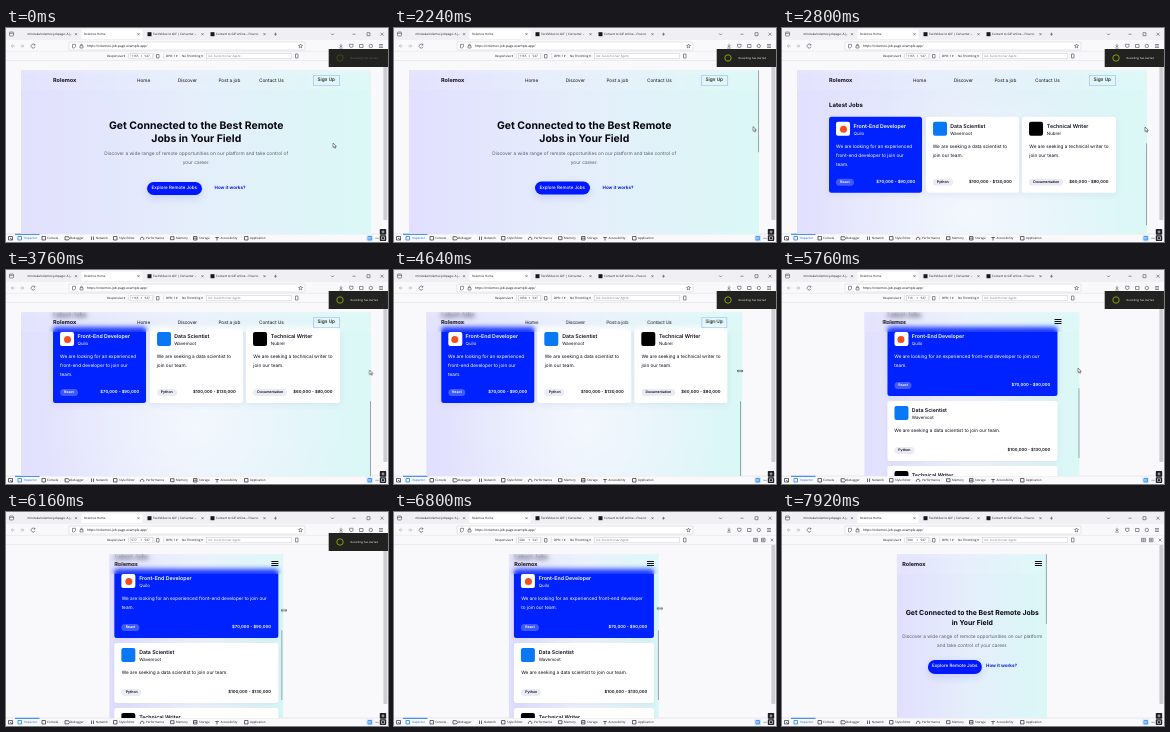
These frames come from a looping animation (382 px wide and 214 px high, 8 s). An HTML page:

```html
<!DOCTYPE html>
<html lang="en">
<head>
<meta charset="utf-8">
<title>Responsive job page</title>
<style>
@property --w { syntax: "<integer>"; inherits: true; initial-value: 1165; }
@property --s { syntax: "<number>"; inherits: true; initial-value: 0; }

* { box-sizing: border-box; margin: 0; padding: 0; }
html, body { width: 100%; height: 100%; overflow: hidden; background: #f9f9fb; }
body { text-rendering: geometricPrecision; }

.stage {
  position: absolute; left: 0; top: 0; width: 382px; height: 214px; overflow: hidden;
  animation: resize 8s linear infinite, scroll 8s linear infinite;
}
.chrome, .over { position: absolute; inset: 0; width: 382px; height: 214px; }
.chrome text, .over text, .dims { font: 3px "Open Sans", "Noto Sans", sans-serif; fill: #15141a; color: #15141a; }
.chrome .soft { fill: #77767f; }
.chrome .tools text { font-weight: 500; }
.icon { fill: none; stroke: #4a4a55; stroke-width: .6; }
.icon.strong { stroke: #2b2a33; stroke-width: .7; }
.icon .faint { stroke: #a5a5ae; }
.field { fill: #fff; stroke: #c9c9d0; stroke-width: .5; }
.dims { position: absolute; left: 125.5px; top: 26px; line-height: 4px; counter-reset: w var(--w); }
.dims::before { content: counter(w); }

/* Simulated device */
.view {
  position: absolute; left: 190.3px; top: 42px; height: 164px;
  width: calc(var(--w) * .3004px); translate: -50% 0; overflow: hidden;
  container-type: inline-size;
  background: linear-gradient(90deg, #e1dffe, #e5eefb 48%, #daf8f6);
  font: 4.7px/9px Inter, "Open Sans", sans-serif; color: #0b0b18;
}
.inner { width: calc(100cqw - 10px); margin: 0 auto; position: relative; }
.page { position: absolute; left: 0; right: 0; top: 0; translate: 0 calc(var(--s) * -1px); }

.head {
  position: absolute; left: 0; right: 0; top: 0; height: 20px;
  background: rgba(255, 255, 255, .1);
  -webkit-backdrop-filter: blur(2.5px); backdrop-filter: blur(2.5px);
}
.head .inner { height: 20px; line-height: 22.4px; white-space: nowrap; }
.logo { font-size: 5.5px; font-weight: 700; }
.links { display: none; position: absolute; left: 35px; top: 0; list-style: none; }
.links li { width: 40.7px; }
.sign { display: none; position: absolute; right: 0; top: 5px; height: 11px; line-height: 11.8px; padding: 0 4.5px; font-weight: 500; border-radius: 1.5px; }
.menu { position: absolute; right: 0; top: 7px; width: 7px; height: 5px; }

.hero { position: relative; height: 164px; text-align: center; }
.hero > * { position: absolute; left: 0; right: 0; margin: 0 auto; }
h1 { top: 53.5px; width: 142px; font-size: 6.9px; line-height: 10px; font-weight: 700; color: #05050c; }
.lead { top: 78.5px; width: 142px; font-size: 4.77px; color: #5b5c6e; }
.acts { top: 106px; display: flex; justify-content: center; gap: 4px; line-height: 13.5px; font-size: 4.5px; }
.acts b { color: #0a1fe8; }
.go { padding: 0 4.5px; border-radius: 7px; background: #0018ff; color: #fff; font-weight: 500; box-shadow: 0 3px 8px rgba(10, 28, 255, .14); }

.jobs { padding-top: 14px; background: radial-gradient(ellipse 45% 60% at 50% 55%, rgba(255, 255, 255, .55), transparent); height: 230px; }
.jobs .inner { max-width: 170px; }
h2 { font-size: 6px; line-height: 8px; font-weight: 700; margin-bottom: 6.5px; }
.cards { display: grid; gap: 4.5px; }
.card { padding: 5.5px 7px 7.5px; border-radius: 2.5px; background: #fff; box-shadow: 0 2px 6px rgba(60, 70, 160, .08); }
.card.hot { background: #0022ff; color: #fff; }
.who { position: relative; height: 14px; padding: 1.8px 0 0 17.5px; line-height: 7px; font-size: 4.4px; margin-bottom: 6.5px; white-space: nowrap; }
.who b { display: block; font-size: 5.25px; font-weight: 600; }
.who i { position: absolute; left: 0; top: 0; width: 14px; height: 14px; border-radius: 2px; background: var(--c); }
.hot i::after { content: ""; position: absolute; inset: 3.5px; border-radius: 50%; background: #f24e1e; }
.foot { display: flex; justify-content: space-between; margin-top: 11px; line-height: 7px; font-size: 4.2px; font-weight: 600; white-space: nowrap; }
.foot span { font-size: 3.5px; padding: 0 4px; border-radius: 4px; background: #ebebf5; }
.hot .foot span { background: rgba(255, 255, 255, .25); }

.thumb {
  --h: 384; position: absolute; right: .2px; top: 0; width: 1.2px; border-radius: 1px; background: rgba(105, 110, 125, .6);
  height: calc(164px * 164 / var(--h)); translate: 0 calc(var(--s) * 164px / var(--h));
  animation: bar 8s step-end infinite;
}

@container (min-width: 173px) {
  .head .inner { max-width: 179px; }
  h1 { top: 48.5px; width: 200px; font-size: 10.45px; line-height: 13px; }
  .lead { top: 79.5px; width: 191px; }
  .acts { top: 111.5px; gap: 13px; }
}
@container (min-width: 230px) {
  .head .inner, .jobs .inner { max-width: 215.5px; }
  .links { display: flex; }
  .sign { display: block; }
  .menu { display: none; }
}
@container (min-width: 298px) {
  .head .inner, .jobs .inner { max-width: 286.5px; }
  .links { left: 84px; }
  .sign { box-shadow: inset 0 0 0 .6px #8fb2f2; }
  .cards { grid-template-columns: repeat(3, 1fr); gap: 3.5px; }
  .card { display: flex; flex-direction: column; height: 76px; padding-bottom: 7px; }
  .foot { margin-top: auto; }
  .thumb { --h: 328; }
}

.toast { animation: leave 8s linear infinite; }
.toast g { animation: appear 8s linear infinite; }
.cursor { animation: move 8s linear infinite; }
.arrow { animation: arrow 8s step-end infinite; }
.grip { animation: grip 8s step-end infinite; }

@keyframes resize {
  0%, 53% { --w: 1165; } 64% { --w: 913; } 72% { --w: 716; } 75% { --w: 610; }
  77%, 78% { --w: 577; } 85%, 100% { --w: 500; }
}
@keyframes scroll {
  0%, 28% { --s: 0; } 29% { --s: 38; } 30% { --s: 78; } 31% { --s: 104; } 32%, 34% { --s: 115; }
  35% { --s: 146; } 36%, 37% { --s: 172; } 38%, 86% { --s: 178; }
  87% { --s: 165; } 89% { --s: 110; } 91%, 93% { --s: 80; }
  95% { --s: 40; } 97% { --s: 10; } 99%, 100% { --s: 0; }
}
@keyframes bar { 0% { opacity: 0; } 28%, 100% { opacity: 1; } }
@keyframes appear { 0%, 1% { opacity: .3; } 8%, 100% { opacity: 1; } }
@keyframes leave { 0%, 78% { transform: none; } 84%, 100% { transform: translateX(62px); } }
@keyframes move {
  0% { transform: translate(327px, 115px); }
  9%, 11% { transform: translate(362px, 98.5px); }
  13%, 14% { transform: translate(363.5px, 98px); }
  18%, 27% { transform: translate(362px, 98.5px); }
  28% { transform: translate(359px, 98.5px); }
  31%, 41% { transform: translate(363px, 99px); }
  44% { transform: translate(364px, 108px); }
  47% { transform: translate(363.5px, 100px); }
  53% { transform: translate(364.5px, 101px); }
  64% { transform: translate(324px, 101px); }
  72% { transform: translate(296px, 98px); }
  75% { transform: translate(280px, 99px); }
  78% { transform: translate(277px, 98px); }
  85%, 100% { transform: translate(265.8px, 96.5px); }
}
@keyframes arrow { 0% { opacity: 1; } 54% { opacity: 0; } 70% { opacity: 1; } 73%, 100% { opacity: 0; } }
@keyframes grip { 0% { opacity: 0; } 54% { opacity: 1; } 70% { opacity: 0; } 73% { opacity: 1; } 88%, 100% { opacity: 0; } }
</style>
</head>
<body>
<div class="stage">
  <svg class="chrome" viewBox="0 0 382 214">
    <rect width="382" height="214" fill="#f9f9fb"/>
    <rect width="382" height="12" fill="#f0f0f4"/>
    <rect x="75.5" y="1.5" width="61" height="9.5" rx="1.2" fill="#fff"/>
    <g class="icon">
      <rect x="3.5" y="4" width="4" height="4" rx=".8"/><path d="M3.5 5.3h4"/>
      <path d="M69 5.2l2 2m0-2l-2 2M131.5 5.2l2 2m0-2l-2 2M195.5 5.2l2 2m0-2l-2 2M257.5 5.2l2 2m0-2l-2 2M268 6.2h3m-1.5-1.5v3"/>
      <path d="M325 5.5l1.5 1.5 1.5-1.5M346.5 6.2h3M361 4.7h3v3h-3zM374.5 4.7l3 3m0-3l-3 3"/>
      <path class="faint" d="M7 16.3l-1.7 1.7 1.7 1.7M5.3 18h3.5M16 16.3l1.7 1.7-1.7 1.7M17.7 18h-3.5"/>
      <path d="M28.8 17a2 2 0 1 0 .2 1.8M28.9 15.8v1.3h-1.3"/>
    </g>
    <rect x="141.5" y="4.2" width="4" height="4" fill="#17171c"/>
    <rect x="204.5" y="4.2" width="4" height="4" fill="#17171c"/>
    <text x="21.5" y="7.3">mirotaka/rolemox-jobpage: A j…</text>
    <text x="78" y="7.3">Rolemox Home</text>
    <text x="147" y="7.3">Text/Video to GIF | Converter –</text>
    <text x="210" y="7.3">Convert to GIF online – Free to</text>

    <rect class="field" x="63" y="14" width="236" height="8" rx="1.2"/>
    <g class="icon">
      <path d="M66.5 16.3h3v1.5a2 2 0 0 1-3 2zM74 17.7h3v2.3h-3zM74.7 17.7v-.7a.8.8 0 0 1 1.6 0v.7"/>
      <path d="M294.5 16l.6 1.3 1.4.2-1 1 .2 1.4-1.2-.7-1.2.7.2-1.4-1-1 1.4-.2z"/>
      <path d="M335 15.8v3m-1.3-1.3l1.3 1.3 1.3-1.3M333.2 20h3.6M343.5 16.3h3.5v1.5a1.7 1.7 0 0 1-3.5 0zM353.5 16.5h3.5v3h-3.5zM373 16.5h4M373 18h4M373 19.5h4"/>
      <circle cx="364.8" cy="18" r="1.7"/>
    </g>
    <text x="81" y="19.2" style="font-size:3.3px">https://rolemox-job-page.example.app/</text>

    <path d="M0 23.3h382M0 32.5h382" stroke="#e2e2e7" stroke-width=".6"/>
    <text x="101" y="29.2">Responsive ▾</text>
    <path d="M122.5 25v6M148 25v6M157.5 25v6" stroke="#d4d4da" stroke-width=".5"/>
    <rect class="field" x="124.5" y="25.3" width="22" height="5.5"/>
    <text x="134.5" y="29.2">×</text><text x="138.5" y="29.2">547</text>
    <g class="icon">
      <path d="M150.500 26.5h2.5v3.5h-2.5zM289.5 26h2.5v4h-2.5zM359.5 26.3h4v3.4h-4zM367.5 26.3h3.5v3.5h-3.5zM376.7 26.7l2.7 2.7m0-2.7l-2.7 2.7"/>
      <circle cx="361.5" cy="28" r=".8"/><circle cx="369.3" cy="28" r=".8"/>
    </g>
    <text x="160" y="29.2">DPR: 1 ▾</text>
    <text x="176" y="29.2">No Throttling ▾</text>
    <rect class="field" x="200.5" y="25.3" width="85" height="5.5"/>
    <text x="202" y="29.2" class="soft">UA: Custom User Agent</text>
    <rect x="377.4" y="33" width="4" height="159" rx="1" fill="#cdcdd2"/>

    <rect y="206" width="382" height="8" fill="#f9f9fb"/>
    <path d="M0 206h382" stroke="#dcdce2" stroke-width=".6"/>
    <path d="M9 206.3h24.5" stroke="#0a72e8" stroke-width=".9"/>
    <g class="icon strong">
      <path d="M2.5 208.5h4v3.5h-4zM4 210l2.5 2"/>
      <path d="M12 208.5h3.5v3.5H12z" stroke="#0a72e8"/>
      <path d="M36 208.5h3.5v3.5H36zM59 208.7h3.5l1 1.6-1 1.6H59zM85.5 212v-3.5m2 3.5v-3.5M107.5 208.5h3.5v3.5h-3.5zM164.5 208.7h3.5v3h-3.5zM187.5 208.5h3.5v3.5h-3.5zM187.5 210.2h3.5M209.3 209.5h3.5M211 209.5v3M238.5 208.5h3.5v3.5h-3.5z"/>
      <path d="M134.5 211.8a1.8 1.8 0 1 1 3.2 0"/>
    </g>
    <g class="tools">
      <text x="17.8" y="211.3" style="fill:#0a62d0">Inspector</text>
      <text x="41" y="211.3">Console</text>
      <text x="64" y="211.3">Debugger</text>
      <text x="90" y="211.3">Network</text>
      <text x="113" y="211.3">Style Editor</text>
      <text x="140" y="211.3">Performance</text>
      <text x="170" y="211.3">Memory</text>
      <text x="193" y="211.3">Storage</text>
      <text x="214.5" y="211.3">Accessibility</text>
      <text x="244" y="211.3">Application</text>
    </g>
    <rect x="360.5" y="207.3" width="6.5" height="6" rx="1" fill="#cfe3fb"/>
    <path d="M362 208.5h3.5v3.5H362zM364 208.5v3.5" fill="none" stroke="#0a72e8" stroke-width=".6"/>
    <path d="M369.5 210.3h3" stroke="#5b5b66" stroke-width=".8" stroke-dasharray=".8 .3"/>
  </svg>
  <div class="dims"></div>

  <div class="view">
    <div class="page">
      <section class="hero">
        <h1>Get Connected to the Best Remote Jobs in&nbsp;Your&nbsp;Field</h1>
        <p class="lead">Discover a wide range of remote opportunities on our platform and take control of your&nbsp;career.</p>
        <div class="acts"><span class="go">Explore Remote Jobs</span><b>How it works?</b></div>
      </section>
      <section class="jobs">
        <div class="inner">
          <h2>Latest Jobs</h2>
          <div class="cards">
            <article class="card hot">
              <div class="who"><i style="--c:#fff"></i><b>Front-End Developer</b>Quilo</div>
              <p>We are looking for an experienced front-end developer to join our team.</p>
              <div class="foot"><span>React</span>$70,000 - $90,000</div>
            </article>
            <article class="card">
              <div class="who"><i style="--c:#0a78f5"></i><b>Data Scientist</b>Wavemoot</div>
              <p>We are seeking a data scientist to join our team.</p>
              <div class="foot"><span>Python</span>$100,000 - $130,000</div>
            </article>
            <article class="card">
              <div class="who"><i style="--c:#000"></i><b>Technical Writer</b>Nubrel</div>
              <p>We are seeking a technical writer to join our team.</p>
              <div class="foot"><span>Documentation</span>$60,000 - $80,000</div>
            </article>
          </div>
        </div>
      </section>
    </div>
    <header class="head">
      <div class="inner">
        <span class="logo">Rolemox</span>
        <ul class="links"><li>Home</li><li>Discover</li><li>Post a job</li><li>Contact Us</li></ul>
        <span class="sign">Sign Up</span>
        <svg class="menu" viewBox="0 0 7 5"><path d="M0 .5h7M0 2.5h7M0 4.5h7" stroke="#0b0b18"/></svg>
      </div>
    </header>
    <div class="thumb"></div>
  </div>

  <svg class="over" viewBox="0 0 382 214">
    <g class="toast">
      <rect x="322.7" y="21" width="60" height="18" fill="#222220"/>
      <g>
        <circle cx="334" cy="30" r="3.2" fill="none" stroke="#8d9a14"/>
        <text x="344.5" y="31" style="font-size:2.7px;fill:#fff">Recording has started</text>
      </g>
    </g>
    <g fill="#1d1d22">
      <rect x="373.8" y="201" width="6.4" height="5.8" rx=".8"/>
      <rect x="373.8" y="207.3" width="6.4" height="5.8" rx=".8"/>
    </g>
    <path d="M375.5 203.9h3m-1.5-1.5v3M375.5 208.8h3v2.8h-3z" fill="none" stroke="#fff" stroke-width=".6"/>
    <g class="cursor">
      <path class="arrow" d="M0 0v4.6l1.1-1 .8 1.7.8-.4-.8-1.6h1.5z" fill="#fff" stroke="#222" stroke-width=".5"/>
      <path class="grip" d="M-2.6 0h5.2M-1.5-1.2L-2.7 0l1.2 1.2M1.5-1.2L2.7 0 1.5 1.2" fill="none" stroke="#222" stroke-width=".7"/>
    </g>
  </svg>
</div>
</body>
</html>
```
